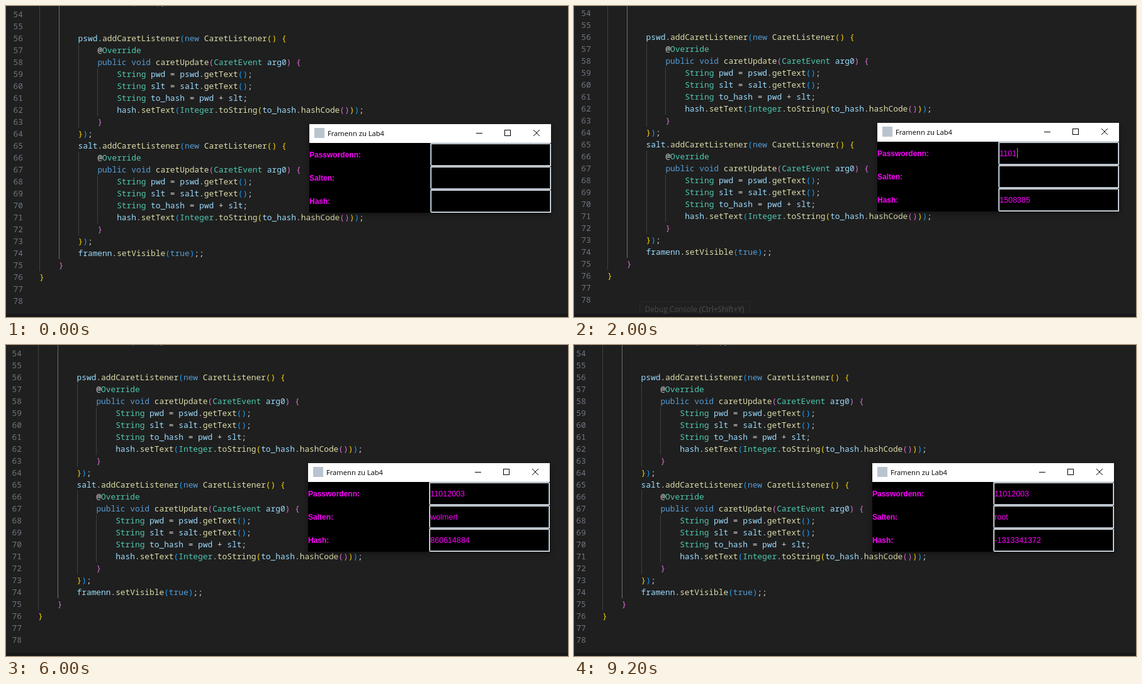
An HTML page that plays this animation: 893x495 px, repeating every 10 s.

```html
<!DOCTYPE html>
<html lang="en">
<head>
<meta charset="utf-8">
<title>Hash form</title>
<style>
html, body { margin: 0; width: 100%; height: 100%; overflow: hidden; background: #1f1f1f; }
svg { display: block; width: 893px; height: 495px; }
text { white-space: pre; }
.code { font: 12.83px "Noto Sans Mono", "DejaVu Sans Mono", monospace; }
.ui { font-family: "Open Sans", "Noto Sans", sans-serif; }
.label { font: bold 12px "Liberation Sans", Arial, sans-serif; fill: #f0f; }
.value { font: 12.5px "Liberation Sans", Arial, sans-serif; fill: #f0f; }
#window { filter: drop-shadow(0 3px 5px rgba(0, 0, 0, .4)); }
</style>
</head>
<body>
<svg id="stage" viewBox="0 0 893 495">
  <rect width="893" height="495" fill="#1f1f1f"/>
  <g id="scene">
    <g id="guides" shape-rendering="crispEdges"></g>
    <g id="editor" class="code"></g>
    <g id="window">
      <rect x="482" y="188" width="384" height="141"/>
      <rect x="482" y="188" width="384" height="30" fill="#fff"/>
      <rect x="490" y="194" width="16" height="16" fill="#b9c4cf"/>
      <text class="ui" x="511" y="207" font-size="11.2">Framenn zu Lab4</text>
      <g fill="none" stroke="#000">
        <path d="M747 202.5h10M792.5 197.5h9v9h-9z" shape-rendering="crispEdges"/>
        <path d="M838 197l10 10M848 197l-10 10"/>
      </g>
      <g id="form"></g>
      <path id="caret" d="M704.5 228v16" stroke="#0f0" shape-rendering="crispEdges"/>
    </g>
  </g>
  <g id="tooltip" class="ui" font-size="11.8">
    <path d="M104.5 489V473.5q0-3 3-3H276.5q3 0 3 3V489" fill="#202020" stroke="#292929"/>
    <text x="112.500" y="487" fill="#484848">Debug Console <tspan fill="#505050">(Ctrl+Shift+Y)</tspan></text>
  </g>
  <rect y="490" width="893" height="5" fill="#181818"/>
</svg>
<script>
const byId = id => document.getElementById(id);

function add(parent, tag, attrs, content = "") {
  const el = document.createElementNS("http://www.w3.org/2000/svg", tag);
  for (const key in attrs) el.setAttribute(key, attrs[key]);
  el.textContent = content;
  parent.appendChild(el);
  return el;
}

// Code listing
const FIRST_LINE = 53, LINE_HEIGHT = 19, CODE_X = 53, CHAR = 7.698;
const BRACKETS = ["#ffd700", "#da70d6", "#179fff"];
const KEYWORDS = ["new", "public", "void", "true"];
const TYPES = ["String", "Integer", "CaretEvent", "Override"];

const listener = name => [
  `        ${name}.addCaretListener(new CaretListener() {`,
  "            @Override",
  "            public void caretUpdate(CaretEvent arg0) {",
  "                String pwd = pswd.getText();",
  "                String slt = salt.getText();",
  "                String to_hash = pwd + slt;",
  "                hash.setText(Integer.toString(to_hash.hashCode()));",
  "            }",
  "        });"
];
const lines = [
  " ".repeat(19) + "(true);", "", "",
  ...listener("pswd"), ...listener("salt"),
  "        framenn.setVisible(true);;", "    }", "}", "", ""
];

let depth = 2;
function colorOf(token, next) {
  if (/[({]/.test(token)) return BRACKETS[depth++ % 3];
  if (/[)}]/.test(token)) return BRACKETS[--depth % 3];
  if (KEYWORDS.includes(token)) return "#569cd6";
  if (TYPES.includes(token)) return "#4ec9b0";
  if (!/\w/.test(token)) return "#d4d4d4";
  return next === "(" ? "#dcdcaa" : "#9cdcfe";
}

const baseline = index => index * LINE_HEIGHT - 1;
lines.forEach((line, i) => {
  const y = baseline(i);
  if (i > 0) add(byId("editor"), "text", { x: 11.6, y, fill: "#6e7681" }, FIRST_LINE + i);
  const code = line.trimStart();
  const row = add(byId("editor"), "text", { x: CODE_X + (line.length - code.length) * CHAR, y });
  const tokens = code.match(/\w+|\s+|./g) || [];
  tokens.forEach((token, k) => add(row, "tspan", { fill: colorOf(token, tokens[k + 1]) }, token));
});

// Indent guides: column, first line, last line
const guides = [[0, 53, 75], [4, 53, 74], [8, 57, 63], [8, 66, 72], [12, 59, 62], [12, 68, 71]];
for (const [column, from, to] of guides) {
  add(byId("guides"), "rect", {
    x: Math.round(CODE_X + column * CHAR), y: (from - 54) * LINE_HEIGHT + 4,
    width: 1, height: (to - from + 1) * LINE_HEIGHT,
    fill: column === 4 ? "#707070" : "#404040"
  });
}

// Form rows
const values = ["Passwordenn:", "Salten:", "Hash:"].map((label, i) => {
  const form = byId("form"), y = 218 + i * 37;
  const frame = (x, top, stroke) => add(form, "rect", {
    x, y: top, width: 190, height: 35, fill: "none", stroke, "shape-rendering": "crispEdges"
  });
  add(form, "text", { class: "label", x: 482, y: y + 23 }, label);
  frame(675.5, y + 1.5, "#fff");
  frame(674.5, y + .5, "#7a8a99");
  return add(form, "text", { class: "value", x: 676.3, y: y + 23 });
});

const STEP = 2000;
const states = [
  { dx: 0, dy: 0, fields: ["", "", ""] },
  { dx: 0, dy: -2, fields: ["1101", "", "1508385"], hover: true },
  { dx: -3, dy: 0, fields: ["1101", "wolmert", "585730117"] },
  { dx: -2, dy: 0, fields: ["11012003", "wolmert", "860614884"] },
  { dx: -8, dy: 0, fields: ["11012003", "root", "-1313341372"] }
];

let shown = -1;
function render(time) {
  const index = Math.floor(time / STEP) % states.length;
  if (index === shown) return;
  shown = index;
  const { dx, dy, fields, hover } = states[index];
  byId("scene").setAttribute("transform", `translate(${dx} ${dy})`);
  values.forEach((el, i) => { el.textContent = fields[i]; });
  for (const id of ["caret", "tooltip"]) byId(id).style.display = hover ? "" : "none";
}

const start = performance.now();
function tick() {
  render(performance.now() - start);
  requestAnimationFrame(tick);
}
tick();
</script>
</body>
</html>
```
